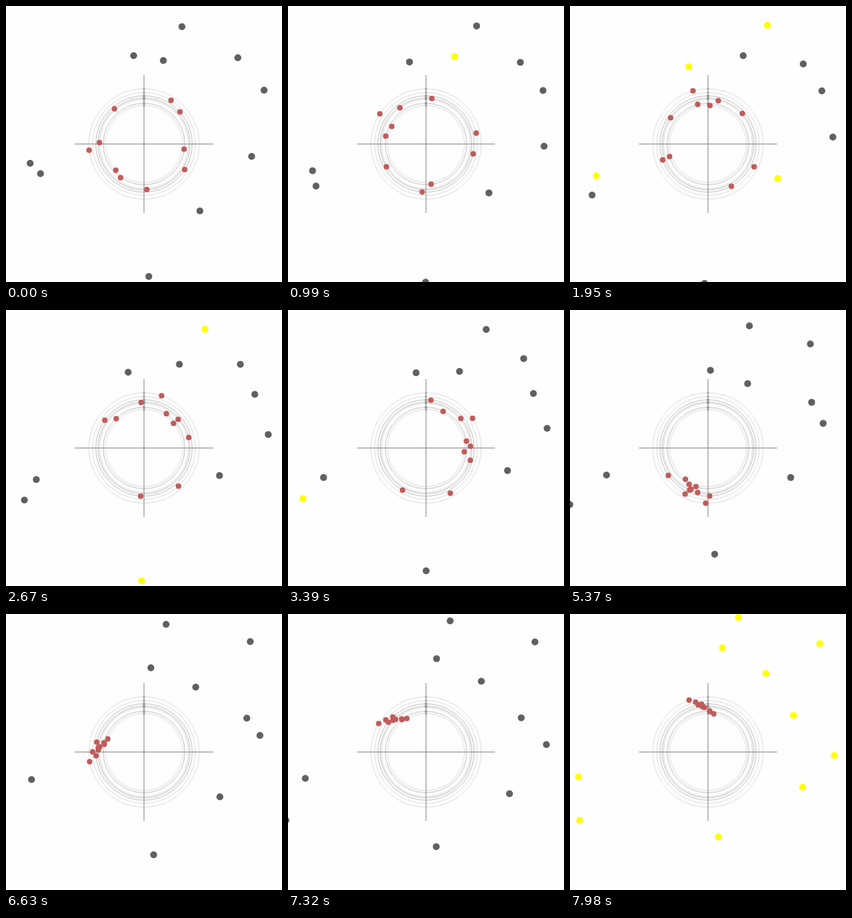
Write an HTML page that moves like this. It is 400 by 400 pixels and loops after 8 s.

```html
<!DOCTYPE html>
<html lang="en">
<head>
<meta charset="utf-8">
<title>Synchronising fireflies</title>
<style>
  html, body { margin: 0; width: 100%; height: 100%; overflow: hidden; background: #fefefe; }
  svg { display: block; width: 100%; height: 100%; }
  .orbit { fill: none; stroke: #000; stroke-opacity: .2; stroke-width: .7; }
  .notch { fill: #777; fill-opacity: .3; }
  .axes { stroke: #808080; stroke-width: 1; }
  .phase { fill: #bf5c5c; }
</style>
</head>
<body>
<svg id="stage" viewBox="0 0 400 400"></svg>
<script>
const LOOP = 8000, STEP = 30, CENTER = 200;
const UNIT_ORBIT = 66.5;           // orbit that turns at one radian per second
const COUPLING = 1;                // pull towards the other phases, per second
const FLASH = Math.cos(22 * Math.PI / 180);
const KEYS = [0, 1.95, 4.47, 6.63, 7.98];

// Orbit radius, starting angle clockwise from the top, and the waypoints of the flight
const FLIES = [
  [80, 263.5, "255,30 286,28 279,27 232,15 244,5"],
  [59.5, 214.8, "185,72 172,88 198,90 210,78 221,49"],
  [66.6, 319.9, "228,79 251,72 248,102 275,106 284,86"],
  [74.5, 31.8, "336,75 338,84 345,58 354,40 362,43"],
  [69.9, 48.2, "374,122 365,123 350,123 349,151 324,147"],
  [58.6, 97.4, "356,218 381,190 369,163 368,176 383,205"],
  [55.8, 227.2, "281,297 301,250 326,230 310,265 337,251"],
  [66.2, 176.5, "207,392 195,402 206,359 214,349 215,323"],
  [64.6, 271.8, "35,228 38,246 58,239 37,240 12,236"],
  [69.6, 122.1, "50,243 32,274 13,273 -14,297 14,299"]
];

const stage = document.getElementById("stage");

function add(name, attrs) {
  const node = document.createElementNS("http://www.w3.org/2000/svg", name);
  for (const key in attrs) node.setAttribute(key, attrs[key]);
  return stage.appendChild(node);
}

function place(node, x, y) {
  node.setAttribute("cx", x.toFixed(2));
  node.setAttribute("cy", y.toFixed(2));
}

// Coupled oscillators: each phase has its own pace and is drawn towards the rest
function simulate(orbits, phases) {
  const paces = orbits.map(r => (UNIT_ORBIT / r) ** (4 / 3));
  const history = [phases];
  for (let ms = STEP; ms < LOOP; ms += STEP) {
    const now = history[history.length - 1];
    history.push(now.map((own, i) => {
      const pull = now.reduce((sum, other) => sum + Math.sin(other - own), 0) / now.length;
      return own + (paces[i] + COUPLING * pull) * STEP / 1000;
    }));
  }
  return history;
}

// Smooth curve through the waypoints
function spline(values, t) {
  const last = KEYS.length - 1;
  const slope = k => {
    const a = Math.max(k - 1, 0), b = Math.min(k + 1, last);
    return (values[b] - values[a]) / (KEYS[b] - KEYS[a]);
  };
  let k = 0;
  while (k < last - 1 && t >= KEYS[k + 1]) k++;
  const span = KEYS[k + 1] - KEYS[k];
  const u = (t - KEYS[k]) / span, v = 1 - u;
  return v * v * ((1 + 2 * u) * values[k] + u * span * slope(k))
       + u * u * ((3 - 2 * u) * values[k + 1] - v * span * slope(k + 1));
}

const orbits = FLIES.map(fly => fly[0]);
const history = simulate(orbits, FLIES.map(fly => fly[1] * Math.PI / 180));

orbits.forEach(r => add("circle", { class: "orbit", cx: CENTER, cy: CENTER, r }));
orbits.forEach(r => add("circle", { class: "notch", cx: CENTER, cy: CENTER - r, r: 2 }));
add("path", { class: "axes", d: "M100 200H300M200 100V300" });

const flies = FLIES.map(([r, , route]) => {
  const points = route.split(" ").map(point => point.split(",").map(Number));
  return {
    r,
    xs: points.map(p => p[0]),
    ys: points.map(p => p[1]),
    body: add("circle", { r: 5 }),
    dot: add("circle", { class: "phase", r: 4 })
  };
});

function draw(step) {
  const t = step * STEP / 1000;
  flies.forEach((fly, i) => {
    const phase = history[step][i];
    const height = Math.cos(phase);
    place(fly.dot, CENTER + fly.r * Math.sin(phase), CENTER - fly.r * height);
    place(fly.body, spline(fly.xs, t), spline(fly.ys, t));
    fly.body.setAttribute("fill", height > FLASH ? "#ffff00" : "#606060");
  });
}

const start = performance.now();
function tick() {
  draw(Math.floor((performance.now() - start) % LOOP / STEP));
  requestAnimationFrame(tick);
}
tick();
</script>
</body>
</html>
```
